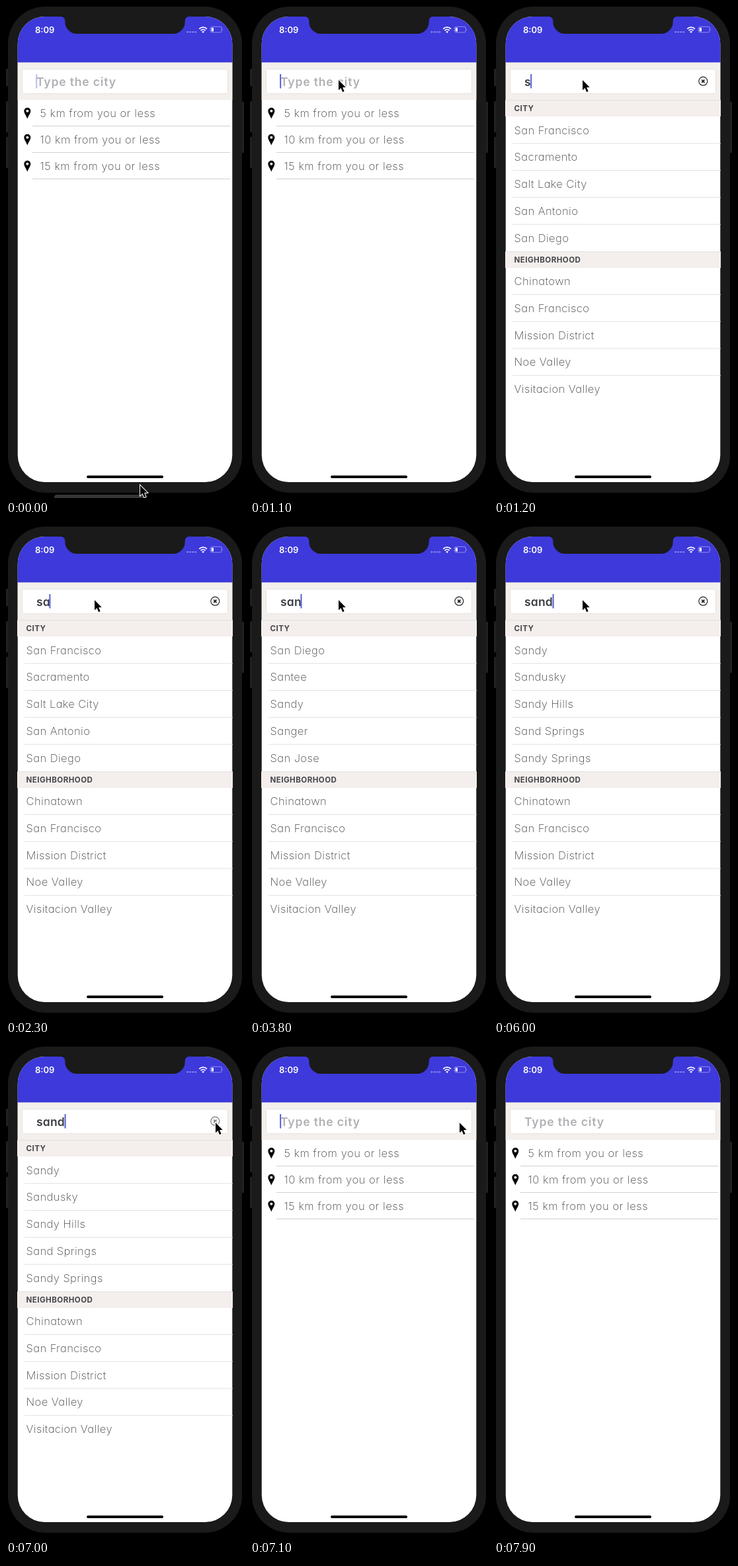
These frames come from a looping animation (360 by 744 pixels, 8000 ms). An HTML page:

```html
<!DOCTYPE html>
<html lang="en">
<head>
<meta charset="utf-8">
<title>City search</title>
<style>
html, body { margin: 0; width: 100%; height: 100%; overflow: hidden; background: #000; }
svg { display: block; width: 100vw; height: 100vh; }
text { font-family: Inter, Lato, sans-serif; font-feature-settings: "cv11"; white-space: pre; }
.row { font-size: 16.5px; font-weight: 240; letter-spacing: .45px; fill: #3f4144; }
#home .row { letter-spacing: .55px; }
.head { font-size: 11.5px; font-weight: 700; letter-spacing: .5px; fill: #45464a; }
.hint { font-size: 17.5px; font-weight: 600; letter-spacing: .85px; fill: #b0b1b4; }
.query { font-size: 17.5px; font-weight: 600; letter-spacing: .2px; fill: #3b3e44; }
.clock { font-size: 13px; font-weight: 600; fill: #fff; }
.line { stroke: #dfe2e3; stroke-width: 1; }

/* one loop is 8 s, so 1.25% is 100 ms */
.on { animation: 8s step-end infinite; visibility: hidden; }
#home  { animation-name: home; }
#found { animation-name: found; }
#q1 { animation-name: q1; }
#q2 { animation-name: q2; }
#q3 { animation-name: q3; }
#q4 { animation-name: q4; }
#c1 { animation-name: c1; }
#c2 { animation-name: c2; }
#c3 { animation-name: c3; }
#c4 { animation-name: c4; }
#dock { animation-name: dock; }
@keyframes home  { 0% { visibility: visible } 15% { visibility: hidden } 88.75%, 100% { visibility: visible } }
@keyframes found { 0% { visibility: hidden } 15% { visibility: visible } 88.75%, 100% { visibility: hidden } }
@keyframes q1 { 0% { visibility: hidden } 15% { visibility: visible } 27.5%, 100% { visibility: hidden } }
@keyframes q2 { 0% { visibility: hidden } 27.5% { visibility: visible } 41.25%, 100% { visibility: hidden } }
@keyframes q3 { 0% { visibility: hidden } 41.25% { visibility: visible } 57.5%, 100% { visibility: hidden } }
@keyframes q4 { 0% { visibility: hidden } 57.5% { visibility: visible } 88.75%, 100% { visibility: hidden } }
@keyframes c1 { 0% { visibility: hidden } 15% { visibility: visible } 32.5%, 100% { visibility: hidden } }
@keyframes c2 { 0% { visibility: hidden } 32.5% { visibility: visible } 47.5%, 100% { visibility: hidden } }
@keyframes c3 { 0% { visibility: hidden } 47.5% { visibility: visible } 62.5%, 100% { visibility: hidden } }
@keyframes c4 { 0% { visibility: hidden } 62.5% { visibility: visible } 88.75%, 100% { visibility: hidden } }
@keyframes dock { 0% { visibility: visible } 1.25%, 100% { visibility: hidden } }

#clear { animation: press 8s step-end infinite; }
@keyframes press { 0% { opacity: 1 } 87.5%, 100% { opacity: .6 } }

#caret { animation: type 8s step-end infinite, blink 8s linear infinite; }
@keyframes type {
  0% { transform: translateX(45.2px) }
  15% { transform: translateX(55.2px) }
  27.5% { transform: translateX(65.4px) }
  41.25% { transform: translateX(76.5px) }
  57.5% { transform: translateX(88.6px) }
  88.75%, 100% { transform: translateX(45.2px) }
}
@keyframes blink {
  0% { opacity: .4 }
  1.25%, 6.25% { opacity: 1 }
  8.75%, 12.5% { opacity: 0 }
  13.75%, 21.25% { opacity: 1 }
  25%, 27.4% { opacity: 0 }
  27.5%, 35% { opacity: 1 }
  37.5%, 41.2% { opacity: 0 }
  41.25%, 50% { opacity: 1 }
  52.5%, 57.4% { opacity: 0 }
  57.5%, 66.25% { opacity: 1 }
  70%, 72.5% { opacity: 0 }
  75%, 80% { opacity: 1 }
  82.5%, 85% { opacity: 0 }
  87.4%, 93.75% { opacity: 1 }
  97.5%, 100% { opacity: 0 }
}

#arrow { animation: move 8s linear infinite; }
@keyframes move {
  0%, 1.2% { transform: translate(203px, 725px) }
  2.5% { transform: translate(193px, 683px) }
  3.75% { transform: translate(178px, 620px) }
  5% { transform: translate(154px, 526px) }
  6.25% { transform: translate(126px, 415px) }
  7.5% { transform: translate(108px, 307px) }
  8.75% { transform: translate(115px, 226px) }
  10% { transform: translate(128px, 150px) }
  11.25% { transform: translate(134px, 112px) }
  77.5% { transform: translate(134px, 112px); animation-timing-function: ease-in-out }
  86.25% { transform: translate(317px, 116px) }
  94.9% { transform: translate(317px, 116px); visibility: visible }
  95%, 100% { transform: translate(317px, 116px); visibility: hidden }
}
</style>
</head>
<body>
<svg viewBox="0 0 360 744" preserveAspectRatio="none">
  <defs>
    <clipPath id="screen"><rect x="17.7" y="16" width="324.6" height="704" rx="41"/></clipPath>
    <path id="pin" fill-rule="evenodd" d="M0 8.5C-1.2 5-5-.2-5-3.3A5 5 0 0 1 5-3.3C5-.2 1.2 5 0 8.5ZM0-5.2A2 2 0 1 0 0-1.2A2 2 0 1 0 0-5.2Z"/>
  </defs>

  <!-- phone -->
  <g fill="#202020">
    <rect y="95" width="6" height="26"/>
    <rect y="144" width="6" height="47"/>
    <rect y="198" width="6" height="47"/>
    <rect x="354" y="145" width="6" height="77"/>
  </g>
  <rect x="3" y="1" width="354" height="735" rx="56" fill="#1a1a1a"/>
  <rect id="dock" class="on" x="73" y="739" width="139" height="12" rx="4" fill="#363636"/>

  <g clip-path="url(#screen)">
    <rect x="17" y="16" width="326" height="704" fill="#fff"/>
    <rect x="17" y="16" width="326" height="70" fill="#3d39db"/>
    <rect x="17" y="85.3" width="326" height="56.7" fill="#f3efec"/>
    <rect x="24.5" y="95.5" width="311" height="37" rx="2" fill="#fff" stroke="#e6e2df"/>

    <g id="home" class="on">
      <text class="hint" x="46" y="121">Type the city</text>
    </g>

    <g id="found" class="on">
      <g id="clear" fill="none" stroke="#222">
        <circle cx="316.3" cy="113.7" r="6.5" stroke-width="1.2"/>
        <path d="M314.2 111.6l4.2 4.2m0-4.2l-4.2 4.2" stroke-width="1.9"/>
      </g>
    </g>

    <text id="q1" class="query on" x="46" y="121">s</text>
    <text id="q2" class="query on" x="46" y="121">sa</text>
    <text id="q3" class="query on" x="46" y="121">san</text>
    <text id="q4" class="query on" x="46" y="121">sand</text>
    <g id="c1" class="on"></g>
    <g id="c2" class="on"></g>
    <g id="c3" class="on"></g>
    <g id="c4" class="on"></g>

    <rect id="caret" y="103" width="1.8" height="21.5" fill="#4050cf"/>
  </g>

  <!-- notch, status bar, home bar -->
  <path fill="#1a1a1a" d="M83 15V16Q89.3 16.3 89.3 23V24A18 18 0 0 0 107.3 42H252.7A18 18 0 0 0 270.7 24V23Q270.7 16.3 277 16V15Z"/>
  <text class="clock" x="44" y="40.5">8:09</text>
  <g fill="#fff" opacity=".38">
    <circle cx="274.8" cy="39.3" r="1.4"/><circle cx="278.8" cy="39.3" r="1.4"/>
    <circle cx="282.8" cy="39.3" r="1.4"/><circle cx="286.8" cy="39.3" r="1.4"/>
  </g>
  <g fill="none" stroke="#fff" stroke-width="1.8">
    <path d="M292.3 34.6a8.2 8.2 0 0 1 11.6 0"/>
    <path d="M294.6 37.1a5 5 0 0 1 7 0"/>
  </g>
  <path d="M298.1 41l-2-2.2a3 3 0 0 1 4 0Z" fill="#fff"/>
  <rect x="309.3" y="31.3" width="17" height="8.6" rx="2.4" fill="none" stroke="#fff" stroke-opacity=".45"/>
  <rect x="310.7" y="32.7" width="3.3" height="5.8" rx="1" fill="#fff"/>
  <path d="M327.6 34.2q1.5 1.4 0 2.9Z" fill="#fff" opacity=".5"/>
  <rect x="122" y="710" width="116" height="4" rx="2"/>

  <g id="arrow">
    <path d="M0 0V15.2L3.5 12L6 18L8.6 16.9L6.1 11H10.8Z" stroke="#fff" stroke-width="2" paint-order="stroke"/>
  </g>
</svg>
<script>
const PITCH = 40.8;
const get = id => document.getElementById(id);
const text = (cls, x, y, s) => `<text class="${cls}" x="${x}" y="${y}">${s}</text>`;
const line = (x1, x2, y, extra = "") => `<path class="line" d="M${x1} ${y}H${x2}" ${extra}/>`;
const rows = (names, top) =>
  names.map((s, i) => text("row", 30.5, top + 26.5 + i * PITCH, s)).join("");
const rules = (n, top) =>
  Array.from({ length: n }, (_, i) => line(28, 343, top + (i + 1) * PITCH)).join("");
const head = (s, y) =>
  `<rect x="17" y="${y}" width="326" height="25" fill="#f4eeec"/>` +
  line(17, 343, y + .5) + text("head", 30.5, y + 17, s);

get("home").innerHTML += [5, 10, 15].map((km, i) => {
  const y = 162 + i * 40;
  return `<use href="#pin" x="32.3" y="${y}"/>` +
    text("row", 51.5, y + 6, `${km} km from you or less`) +
    line(40, 339, y + 19.5, 'style="stroke:#cfd1d3"');
}).join("");

const areas = ["Chinatown", "San Francisco", "Mission District", "Noe Valley", "Visitacion Valley"];
get("found").innerHTML += head("CITY", 142) + rules(4, 167) +
  head("NEIGHBORHOOD", 371) + rules(4, 395.5) + rows(areas, 395.5);

const cities = {
  c1: ["San Francisco", "Sacramento", "Salt Lake City", "San Antonio", "San Diego"],
  c2: ["San Antonio", "Sacramento", "San Diego", "San Jose", "Santee"],
  c3: ["San Diego", "Santee", "Sandy", "Sanger", "San Jose"],
  c4: ["Sandy", "Sandusky", "Sandy Hills", "Sand Springs", "Sandy Springs"]
};
for (const id in cities) get(id).innerHTML = rows(cities[id], 167);
</script>
</body>
</html>
```
